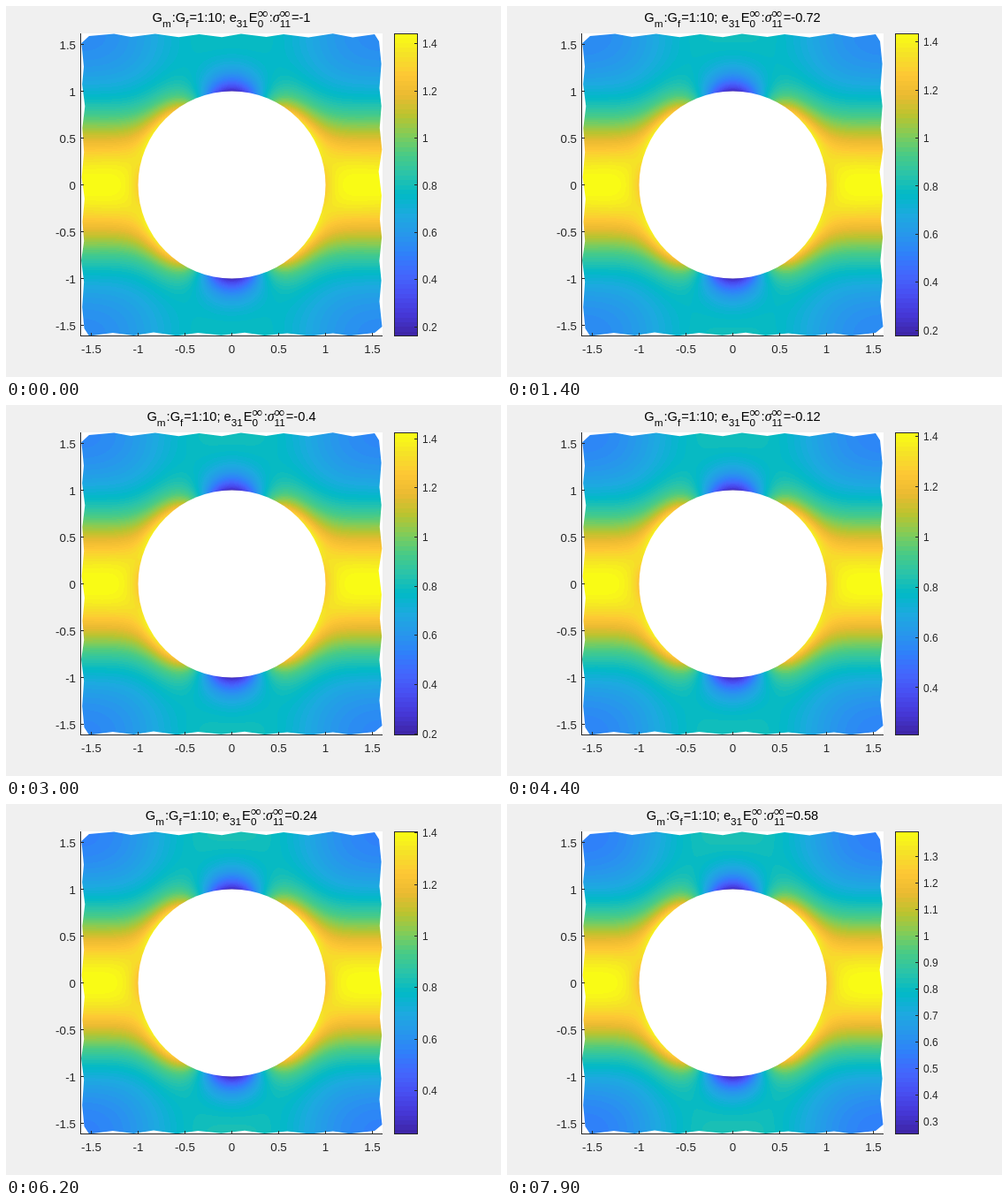
Write an HTML page with a canvas that moves like this. It is 560x420 px and loops after 8000 ms.

```html
<!DOCTYPE html>
<html lang="en">
<head>
<meta charset="utf-8">
<title>Stress around a circular fibre</title>
<style>
html, body { margin: 0; width: 100%; height: 100%; overflow: hidden; background: #f0f0f0; }
canvas, svg { position: absolute; left: 0; top: 0; width: 560px; height: 420px; }
text { font-family: "Liberation Sans", Arial, sans-serif; fill: #262626; white-space: pre; }
.axis { font-size: 13.33px; }
.bar { font-size: 12px; }
.title text { font-size: 14.67px; fill: #000; }
.title .sub { font-size: 11.73px; }
.title .sup { font: 17px "Liberation Serif", Times, serif; }
.title .sigma { font: italic 16px "Liberation Serif", Times, serif; }
path { stroke: #262626; stroke-width: 1; fill: none; shape-rendering: crispEdges; }
</style>
</head>
<body>
<canvas width="560" height="420"></canvas>
<svg viewBox="0 0 560 420">
  <path id="frame"/>
  <g id="labels"></g>
  <path id="barTicks"/>
  <g id="barLabels"></g>
  <g class="title" id="title"></g>
</svg>
<script>
const STEP = 100, STEPS = 80;
const LEFT = 85, TOP = 31, W = 341, H = 343, RIGHT = LEFT + W, BOTTOM = TOP + H;
const CX = 255.5, CY = 202.5, UNIT = 106.3, CELL = 3.2;
const $ = id => document.getElementById(id);
const ctx = document.querySelector('canvas').getContext('2d');

// Colour map: evenly spaced stops, expanded to 64 levels
const stops = ('3e26a8 4538d7 484ff2 4367fd 2f80fa 2797eb 1caadf 01b9c7 ' +
  '29c3aa 48cb86 81cc59 bbc42f eaba31 fec735 f5e128 f9fb15').split(' ')
  .map(s => [0, 2, 4].map(i => parseInt(s.slice(i, i + 2), 16)));
const palette = Array.from({ length: 64 }, (_, n) => {
  const p = n / 63 * (stops.length - 1), i = Math.min(stops.length - 2, Math.floor(p));
  return stops[i].map((c, j) => Math.round(c + (stops[i + 1][j] - c) * (p - i)));
});

// Disturbance by one inclusion, apart from its cos 2θ part
function multipole(c2, r2) {
  const c4 = 2 * c2 * c2 - 1, c6 = 2 * c2 * c4 - c2, c8 = 2 * c4 * c4 - 1;
  return (0.545 * c4 + (0.085 - 0.793 * c4 + 0.146 * c6 - (0.094 * c6 + 0.035 * c8) / r2) / r2) / r2;
}

// Stress field: the disturbances summed over a square lattice
const base = new Float32Array(W * H), dipole = new Float32Array(W * H);
for (let j = 0, n = 0; j < H; j++) {
  for (let i = 0; i < W; i++, n++) {
    const x = (LEFT + i + 0.5 - CX) / UNIT, y = (CY - TOP - j - 0.5) / UNIT;
    if (x * x + y * y < 0.975) { base[n] = NaN; continue; }
    for (let a = -2; a <= 2; a++) {
      for (let b = -2; b <= 2; b++) {
        const dx = x - a * CELL, dy = y - b * CELL;
        const r2 = dx * dx + dy * dy, c2 = (dx * dx - dy * dy) / r2;
        base[n] += multipole(c2, r2);
        dipole[n] += c2 / r2;
      }
    }
  }
}

const layer = document.createElement('canvas');
layer.width = W;
layer.height = H;
const layerCtx = layer.getContext('2d');
const pixels = layerCtx.createImageData(W, H);

// Ragged mesh outline: every side zigzags between the axes and a few pixels inward
let seed = 7;
const random = () => (seed = seed * 16807 % 2147483647) / 2147483647;
function side(place) {
  const n = 13, list = [];
  for (let i = 0; i <= n; i++) {
    const inner = i % 2 ? 0 : 3;
    const along = 9 + (W - 18) * i / n + (i % n ? 8 * random() - 4 : 0);
    list.push(place(along, inner + 1.5 * random()));
  }
  return list;
}
const outline = [
  ...side((s, d) => [LEFT + s, TOP + d]),
  ...side((s, d) => [RIGHT - d, TOP + s]),
  ...side((s, d) => [RIGHT - s, BOTTOM - d]),
  ...side((s, d) => [LEFT + d, BOTTOM - s])
];
const mesh = new Path2D('M' + outline.map(p => p.join()).join('L') + 'Z');

function text(parent, x, y, str, cls, anchor = 'start') {
  const el = document.createElementNS('http://www.w3.org/2000/svg', 'text');
  el.setAttribute('x', x);
  el.setAttribute('y', y);
  el.setAttribute('class', cls);
  el.setAttribute('text-anchor', anchor);
  el.textContent = str;
  parent.append(el);
  return el;
}

let axes = `M${LEFT - 0.5} ${TOP}V${BOTTOM - 0.5}H${RIGHT}M439.5 31.5H465.5V373.5H439.5Z`;
for (let v = -1.5; v <= 1.5; v += 0.5) {
  const x = Math.round(CX + v * UNIT - 0.5), y = Math.round(CY - v * UNIT - 0.5);
  axes += `M${x + 0.5} ${BOTTOM}v-4M84 ${y + 0.5}h4`;
  text($('labels'), x + 0.5, 393, v, 'axis', 'middle');
  text($('labels'), 79, y + 6, v, 'axis', 'end');
}
$('frame').setAttribute('d', axes);

// Title: _ starts a subscript, ^ a superscript stacked on the one before
const title = $('title');
let pen = 0, stack = 0;
for (const part of 'G|_m|:G|_f|=1:10; e|_31|E|_0|^∞|:|σ|_11|^∞'.split('|')) {
  const sub = part[0] === '_', sup = part[0] === '^';
  const cls = sub ? 'sub' : sup ? 'sup' : part === 'σ' ? 'sigma' : '';
  const x = sup ? stack : pen;
  const el = text(title, x, sub ? 24 : sup ? 14 : 18, sub || sup ? part.slice(1) : part, cls);
  stack = x;
  pen = Math.max(pen, x + el.getComputedTextLength() + (sub || sup ? 1 : 0));
}
const value = text(title, pen, 18, '', '');

function drawField(P) {
  let min = Infinity, max = -Infinity;
  for (let n = 0; n < base.length; n++) {
    const f = base[n] + P * dipole[n];
    if (f < min) min = f;
    if (f > max) max = f;
  }
  const scale = 64 / (max - min), out = pixels.data;
  for (let n = 0, o = 0; n < base.length; n++, o += 4) {
    const f = base[n] + P * dipole[n];
    if (isNaN(f)) continue;
    const c = palette[Math.min(63, Math.floor((f - min) * scale))];
    out[o] = c[0];
    out[o + 1] = c[1];
    out[o + 2] = c[2];
    out[o + 3] = 255;
  }
  layerCtx.putImageData(pixels, 0, 0);

  ctx.fillStyle = '#fff';
  ctx.fillRect(LEFT, TOP, W, H);
  ctx.save();
  ctx.clip(mesh);
  ctx.drawImage(layer, LEFT, TOP);
  ctx.restore();
  ctx.beginPath();
  ctx.arc(CX, CY, 106, 0, 2 * Math.PI);
  ctx.fill();
}

function ticksFor(step, lo, hi) {
  const list = [];
  for (let i = Math.ceil(lo / step); i * step <= hi; i++) list.push(i * step);
  return list;
}

function drawBar(lo, hi) {
  let ticks = ticksFor(0.2, lo, hi), d = '';
  if (ticks.length < 6) ticks = ticksFor(0.1, lo, hi);
  $('barLabels').replaceChildren();
  for (const v of ticks) {
    const y = BOTTOM - (v - lo) / (hi - lo) * H;
    d += `M466 ${Math.floor(y) + 0.5}h-4`;
    text($('barLabels'), 471, Math.round(y + 4.6), +v.toFixed(1), 'bar');
  }
  $('barTicks').setAttribute('d', d);
}

palette.forEach((c, n) => {
  const y = Math.round(BOTTOM - (n + 1) * H / 64);
  ctx.fillStyle = `rgb(${c})`;
  ctx.fillRect(439, y, 27, Math.round(BOTTOM - n * H / 64) - y);
});

function show(k) {
  const s = k * 0.02;
  drawField(0.342 - 0.038 * s);
  drawBar(0.159 + 0.0576 * s, 1.444 - 0.0306 * s);
  value.textContent = '=' + +(s - 1).toFixed(2);
  const width = pen + value.getComputedTextLength();
  title.setAttribute('transform', `translate(${255 - width / 2} 0)`);
}

const start = performance.now();
let shown = -1;
function tick() {
  const k = Math.floor((performance.now() - start) / STEP) % STEPS;
  if (k !== shown) show(shown = k);
  requestAnimationFrame(tick);
}
tick();
</script>
</body>
</html>
```
